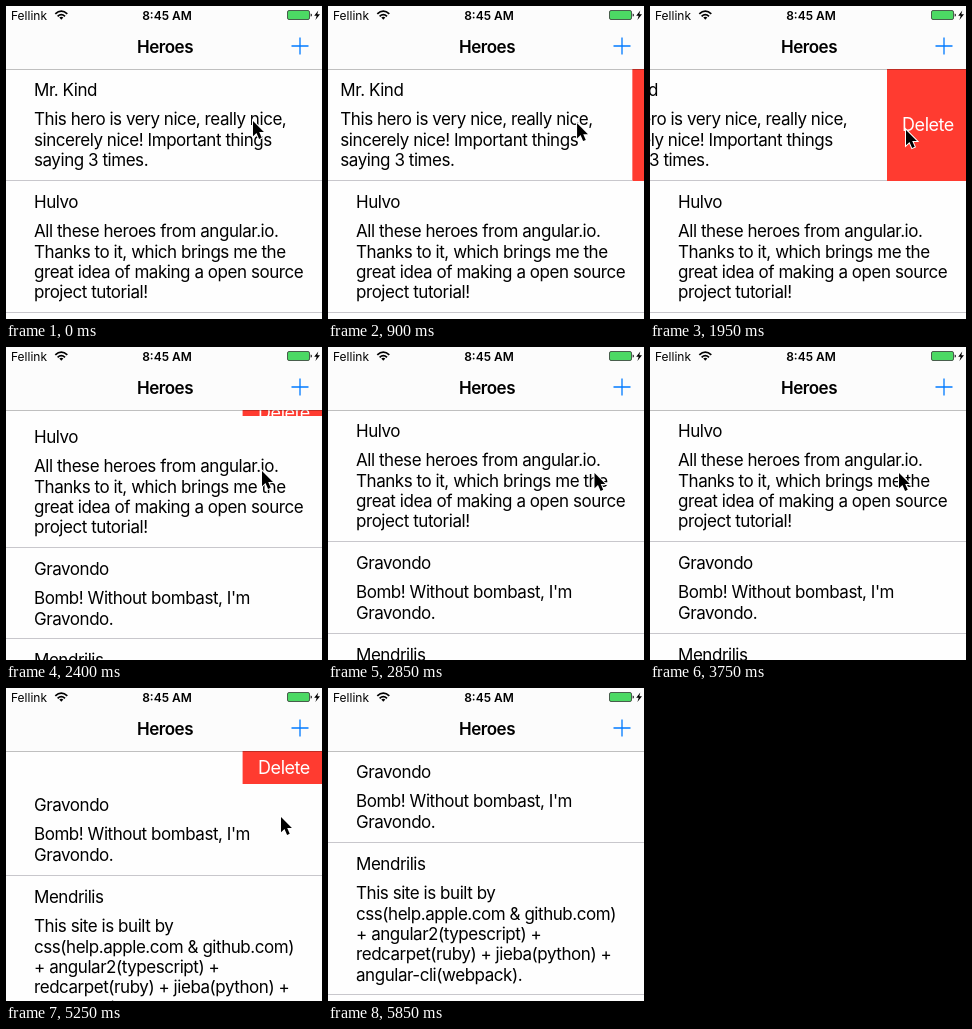
Animation of 316x313 px, one loop 6750 ms. Source, as an HTML page:

```html
<!DOCTYPE html>
<html lang="en">
<head>
<meta charset="utf-8">
<title>Heroes</title>
<style>
  html, body { margin: 0; width: 100%; height: 100%; overflow: hidden; background: #fefefe; }
  svg { display: block; }
  text { font: 17px Inter, "Open Sans", sans-serif; letter-spacing: -.45px; white-space: pre; }
  .delete { font-size: 18px; fill: #fff; text-anchor: middle; }
  .heading { font-weight: 600; text-anchor: middle; }
  .status { font-size: 12px; letter-spacing: 0; }
  .clock { font-size: 12px; font-weight: 600; letter-spacing: 0; text-anchor: middle; }
</style>
</head>
<body>
<svg width="316" height="313" viewBox="0 0 316 313">
  <g id="list"></g>
  <g id="bar">
    <rect width="316" height="63" fill="#fcfcfc"/>
    <rect y="63" width="316" height="1" fill="#000" opacity=".25"/>
    <text class="status" x="5" y="14">Fellink</text>
    <g fill="none" stroke="#000" stroke-width="1.8">
      <path d="M49.3 7.8Q55.3 2.4 61.3 7.8M51.6 10.3Q55.3 7 59 10.3"/>
      <path d="M55.3 13.8l-2-2.2q2-1.5 4 0z" fill="#000" stroke="none"/>
    </g>
    <text class="clock" x="161" y="14">8:45 AM</text>
    <rect x="281.5" y="4.5" width="22" height="9" rx="1.5" fill="#4cd964" stroke="#222" stroke-width=".7"/>
    <path d="M304.6 7.5q1.4 0 1.4 1.5t-1.4 1.5z" fill="#222"/>
    <path d="M312.3 4.5l-4.1 5.3h2.5l-1.3 4.1 4.6-5.6h-2.7z"/>
    <text class="heading" x="159" y="47">Heroes</text>
    <path d="M285.5 40h17M294 31.5v17" stroke="#007aff" stroke-width="1.3"/>
  </g>
  <path id="cursor" d="M0 0V15.2l3.5-3.3 2.6 6 2.6-1.1-2.5-5.8h4.7z" stroke="#fff" stroke-width="2" paint-order="stroke"/>
</svg>
<script>
const LOOP = 6750, STEP = 150, TOP = 63, LINE = 20.3, WIDTH = 320, OPEN = 83;

const heroes = [
  {
    name: "Mr. Kind", swipeAt: 750, deleteAt: 2141,
    lines: ["This hero is very nice, really nice,", "sincerely nice! Important things", "saying 3 times."]
  },
  {
    name: "Hulvo", swipeAt: 3750, deleteAt: 5048,
    lines: ["All these heroes from angular.io.", "Thanks to it, which brings me the", "great idea of making a open source", "project tutorial!"]
  },
  { name: "Gravondo", lines: ["Bomb! Without bombast, I'm", "Gravondo."] },
  {
    name: "Mendrilis",
    lines: ["This site is built by", "css(help.apple.com & github.com)", "+ angular2(typescript) +", "redcarpet(ruby) + jieba(python) +", "angular-cli(webpack)."]
  }
];

// Where the pointer rests or turns: time, x, y.
const stops = [
  [300, 247, 115], [600, 270, 117], [750, 270, 117], [1290, 159, 118], [1950, 256, 124],
  [2400, 256, 124], [3300, 277, 128], [3600, 277, 128], [3750, 249, 126],
  [4050, 165, 130], [4350, 239, 132], [4650, 275, 129], [5250, 275, 129], [5550, 286, 128]
];

// Smooth progress from 0 to 1 over a span of time.
function ease(t, start, duration) {
  const p = Math.min(1, Math.max(0, (t - start) / duration));
  return p * p * (3 - 2 * p);
}

function pointerAt(t) {
  let [, x, y] = stops[0];
  for (let i = 1; i < stops.length; i++) {
    const [from, x0, y0] = stops[i - 1], [to, x1, y1] = stops[i];
    const p = ease(t, from, to - from);
    x += (x1 - x0) * p;
    y += (y1 - y0) * p;
  }
  return [x, y];
}

function set(el, attrs) {
  for (const name in attrs) el.setAttribute(name, attrs[name]);
}

function add(parent, tag, attrs, text = "") {
  const el = document.createElementNS("http://www.w3.org/2000/svg", tag);
  set(el, attrs);
  el.textContent = text;
  return parent.appendChild(el);
}

const list = document.getElementById("list");
const cursor = document.getElementById("cursor");

const rows = heroes.map(({ name, lines, swipeAt = LOOP, deleteAt = LOOP }) => {
  const full = 51 + LINE * lines.length;
  const cell = add(list, "svg", { width: 316 });
  const red = add(cell, "rect", { x: 236.6, width: 80, fill: "#ff3b30" });
  const label = add(cell, "text", { class: "delete", x: 278 }, "Delete");
  const content = add(cell, "g", {});
  add(content, "rect", { width: WIDTH, height: full + 1, fill: "#fefefe" });
  add(content, "text", { x: 28, y: 27.3 }, name);
  lines.forEach((line, i) => add(content, "text", { x: 28, y: 56.3 + LINE * i }, line));
  const rule = add(content, "rect", { width: WIDTH, height: 1, fill: "#c8c7cc" });
  return { full, swipeAt, deleteAt, cell, red, label, content, rule };
});

function draw(t) {
  let y = TOP;
  for (const row of rows) {
    const x = -OPEN * ease(t, row.swipeAt, 540) - WIDTH * ease(t, row.deleteAt, 200);
    const h = row.full * (1 - ease(t, row.deleteAt, 300));
    const top = Math.round(y), height = Math.round(y + h) - top;
    set(row.cell, { y: top, height, display: height ? "inline" : "none" });
    set(row.red, { height, display: x < 0 ? "inline" : "none" });
    set(row.label, { y: h / 2 + 6.4 });
    set(row.content, { transform: `translate(${x})` });
    set(row.rule, { y: height - 1 });
    y += h;
  }
  set(cursor, { transform: `translate(${pointerAt(t)})`, display: t < 5850 ? "inline" : "none" });
}

const start = performance.now();
function tick() {
  const t = (performance.now() - start) % LOOP;
  draw(Math.floor(t / STEP) * STEP);
  requestAnimationFrame(tick);
}
tick();
</script>
</body>
</html>
```
